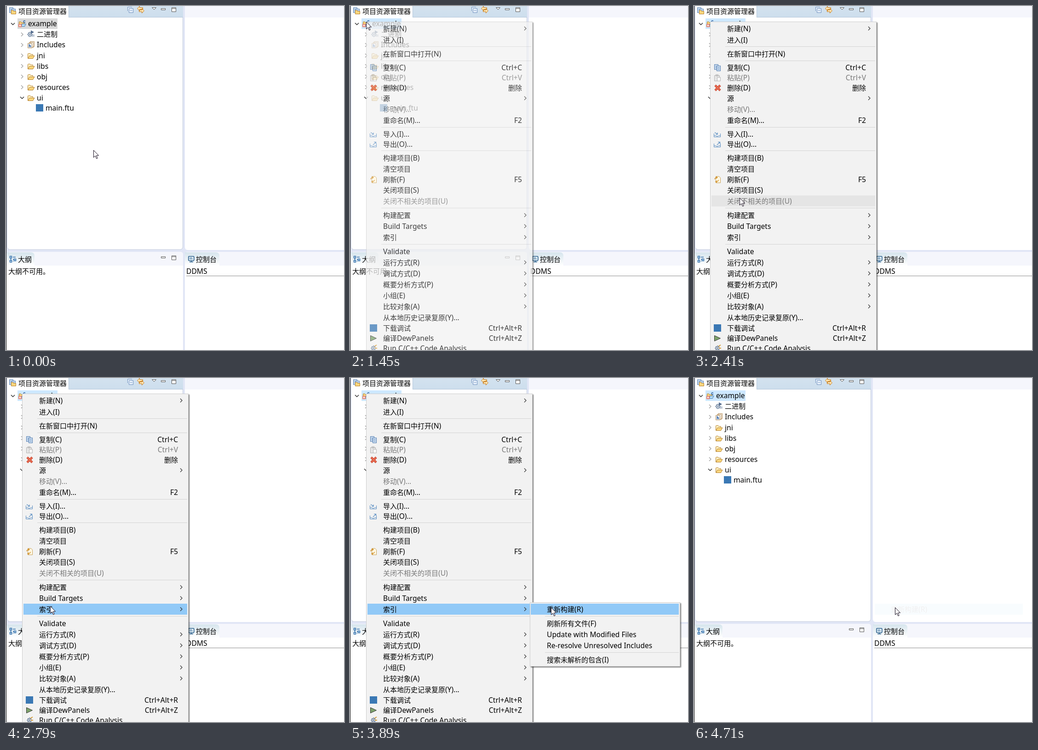
Recreate the animation shown at these times as an HTML page. Size 735 by 750 pixels, loop 4.83 s.

```html
<!DOCTYPE html>
<html lang="zh-CN">
<head>
<meta charset="utf-8">
<title>Rebuild index</title>
<style>
  html, body { margin: 0; width: 100%; height: 100%; overflow: hidden; background: #e1e6f6; }
  svg { display: block; }
  text { font: 15px "Noto Sans", "Noto Sans CJK SC", "Noto Sans CJK", sans-serif; white-space: pre; }
  .latin { font-size: 15.6px; }
  .off { fill: #7a7a7a; }
  .line { fill: none; stroke: #333; stroke-width: 1.2; }
  .panel { fill: #f2f2f2; stroke: #ccc; filter: drop-shadow(2px 2px 1px rgba(0, 0, 0, .5)); }
</style>
</head>
<body>
<svg id="stage" width="735" height="750" viewBox="0 0 735 750">
  <defs>
    <linearGradient id="bar" x2="0" y2="1"><stop stop-color="#d3e2ef"/><stop offset="1" stop-color="#cddeed"/></linearGradient>
    <linearGradient id="tab" x2="0" y2="1"><stop stop-color="#d6e5ed"/><stop offset="1" stop-color="#fff"/></linearGradient>
    <g id="folder" stroke="#b4802e" stroke-linejoin="round">
      <path d="M.5 12V2.500q0-1 1-1h4l1.500 2h4.500v2" fill="#fff0c0"/>
      <path d="M.8 12.500 4 6.500h11l-3.500 6z" fill="#fbd77e"/>
    </g>
    <g id="sheets" fill="#d9e7f5" stroke="#4a76ad">
      <path d="M.5.5h8v11h-8z"/><path d="M5.500 3.500h8v11h-8z"/>
      <path d="M7 6.500h5M7 9h5M7 11.500h5M2 3.500h3M2 6h3M2 8.500h3" stroke="#6b93c4"/>
    </g>
    <g id="gear" fill="none" stroke="#3d5a80">
      <circle cx="6" cy="9" r="4"/><circle cx="6" cy="9" r="1.500"/>
      <path d="M6 3v12M0 9h12M2 5l8 8M10 5l-8 8" stroke-dasharray="2 8 2"/>
    </g>
    <g id="tray" fill="none" stroke="#5b8ec2">
      <path d="M.5 5v7.500h14V5M.5 9.500h4l1.500 1.500h3l1.500-1.500h4"/>
    </g>
  </defs>
  <g id="window"></g>
  <g id="menu"></g>
  <g id="submenu"></g>
  <g id="chosen"></g>
  <path id="cursor" d="M.5.5v15.700l3.600-3.400 2.700 6 2.300-1-2.600-5.800h5z" fill="#fff" stroke="#150a1c"/>
</svg>
<script>
const LOOP = 4830;
const $ = id => document.getElementById(id);

const rect = (x, y, w, h, fill, extra = '') =>
  `<rect x="${x}" y="${y}" width="${w}" height="${h}" fill="${fill}" ${extra}/>`;
const path = (d, extra = 'class="line"') => `<path d="${d}" ${extra}/>`;
const use = (id, x, y) => `<use href="#${id}" x="${x}" y="${y}"/>`;
const text = (x, cy, str, extra = '') =>
  `<text x="${x}" y="${cy + 5.5}" ${extra}>${
    str.replace(/[\x20-\x7e]+/g, s => `<tspan class="latin">${s}</tspan>`)}</text>`;
const chevron = (x, y, color = '#333') => path(`M${x} ${y - 4}l4 4-4 4`, `class="line" style="stroke:${color}"`);
const opened = (x, y) => path(`M${x} ${y - 2}l4 4 4-4`, 'class="line" style="stroke-width:1.5"');
const at = (x, y, body) => `<g transform="translate(${x} ${y})">${body}</g>`;
const badge = (x, y) => rect(x, y, 16, 16, '#3a78b4');
const minMax = y =>
  path(`M337.500 ${y + 2.5}h9v3h-9zM360.500 ${y + .5}h9v9h-9zM360 ${y + 2.5}h10`, 'fill="#fff" stroke="#555"');

function drawWindow() {
  const strip = '#f5f6fc';
  const frames =
    rect(2.5, -10, 382, 541, '#fff', 'rx="6" stroke="#c3cbdc"') +
    rect(137, 0, 248, 24, 'url(#bar)') + rect(136, 24, 249, 1, '#b4c6da') + rect(136, 0, 1, 25, '#b4c6da') +
    rect(389, -10, 360, 542, '#fff', 'rx="6"') + rect(389, 0, 346, 25, strip) +
    rect(1, 536, 384, 230, '#fff', 'rx="6"') +
    path('M1 566V542q0-6 6-6h372q6 0 6 6v24z', `fill="${strip}"`) +
    path('M2 566V537h52q8 0 8 8v21z', 'fill="url(#tab)"') +
    rect(389, 536, 360, 230, '#fff', 'rx="6"') +
    path('M389 566V542q0-6 6-6h340v30z', `fill="${strip}"`) +
    path('M389 566V537h67q8 0 8 8v21z', 'fill="url(#tab)"') +
    rect(392, 588, 343, 1, '#8c8c8c') + rect(0, 0, 1, 750, '#111');

  const tools =
    at(7, 3, use('sheets', 0, 0) + path('M4.500 14.500v-8h4l1 2h5v6z', 'fill="#fbd77e" stroke="#b4802e"')) +
    path('M264.500 11V2.500H274M267.500 5.500h9v9h-9zM269.500 10h5', 'fill="#e8f1fb" stroke="#6d8fbd"') +
    path('M285.500 5.500l5-5v3h7v4h-7v3zM300.500 10.500l-5-5v3h-6v4h6v3z', 'fill="#fde3b0" stroke="#c47b1c"') +
    path('M317.500 3.500h9l-4.500 4.500z', 'fill="#fff" stroke="#555"') + minMax(3) + minMax(544);

  const outline = at(8, 545,
    path('M.5.5h4v4h-4zM.5 9.500h4v4h-4z', 'fill="#d5e8f7" stroke="#2f6ca8" stroke-width="1.400"') +
    path('M7 2.500h6M7 7.500h2M7 11.500h1M2.500 5v4', 'stroke="#2f6ca8" stroke-width="1.400"') +
    path('M9.500 6.500h4v4h-4z', 'fill="#d5e8f7" stroke="#2f6ca8" stroke-width="1.400"'));
  const screen = at(396, 545,
    rect(.8, .8, 12, 9.500, '#e8f4fb', 'rx="1.500" stroke="#2b5f8c" stroke-width="1.600"') +
    path('M3 4h6M3 6.500h7', 'stroke="#2b5f8c"') + path('M3 13h8M7 10v3', 'stroke="#2b5f8c" stroke-width="1.600"'));

  const folders = ['jni', 'libs', 'obj', 'resources', 'ui'].map((name, i) => {
    const y = 108 + 23 * i;
    return (name === 'ui' ? opened(31, y) : chevron(33, y, '#999')) + use('folder', 47, y - 6) + text(67, y, name);
  }).join('');

  const project = at(27, 31,
    path('M1.500 13V3.500h4l1 2h6V13z', 'fill="#fbd77e" stroke="#b4802e"') +
    path('M6 13.500 8 8h8l-2.500 5.500z', 'fill="#b9dcf2" stroke="#3a78b4"') +
    rect(0, 8, 7, 7, '#e0715f') + path('M1.500 9.500l4 4M5.500 9.500l-4 4', 'stroke="#fff" stroke-width="1.300"') +
    path('M15 1.500q-4-1.500-4 1.500t4 1.500', 'fill="none" stroke="#2a5f9e" stroke-width="1.400"'));
  const binary = at(46, 53, use('gear', 0, 0) +
    path('M8 0v8l7-4z', 'fill="#536b8d"') + path('M11.500 9v5M14.500 9v5', 'stroke="#536b8d"'));
  const headers = at(47, 77,
    path('M5.500 4V.5h9v11H11M3.500 6V2.500h9v11H10', 'fill="#fff" stroke="#b58c55"') +
    path('M.5 4.500h9v10h-9z', 'fill="#eef5fc" stroke="#b58c55"') +
    path('M3.500 6v7M3.500 10q3-2 3 1v2', 'fill="none" stroke="#24579a" stroke-width="1.500"'));

  const tree =
    rect(25.5, 27.5, 86, 22, '#d9d9d9', 'id="selected"') +
    opened(11, 39) + project + text(48, 38.500, 'example') +
    chevron(33, 62, '#999') + binary + text(67, 61.500, '二进制') +
    chevron(33, 85, '#999') + headers + text(67, 84.500, 'Includes') +
    folders + badge(65, 214) + text(86, 222.500, 'main.ftu');

  $('window').innerHTML = frames + tools + outline + screen + tree +
    text(27, 11.500, '项目资源管理器') + text(26, 552.500, '大纲') + text(5, 578.500, '大纲不可用。') +
    text(413, 552.500, '控制台') + text(392, 578.500, 'DDMS');
}

// centre y, label, shortcut ('>' opens a submenu), disabled
const rows = [
  [49, '新建(N)', '>'], [74, '进入(I)'], [104, '在新窗口中打开(N)'],
  [134, '复制(C)', 'Ctrl+C'], [156, '粘贴(P)', 'Ctrl+V', true], [178, '删除(D)', '删除'],
  [201, '源', '>'], [225, '移动(V)...', '', true], [249, '重命名(M)...', 'F2'],
  [279, '导入(I)...'], [301, '导出(O)...'],
  [331, '构建项目(B)'], [355, '清空项目'], [378, '刷新(F)', 'F5'],
  [401, '关闭项目(S)'], [425, '关闭不相关的项目(U)', '', true],
  [456, '构建配置', '>'], [480, 'Build Targets', '>'], [504, '索引', '>'],
  [535, 'Validate'], [559, '运行方式(R)', '>'], [583, '调试方式(D)', '>'],
  [607, '概要分析方式(P)', '>'], [631, '小组(E)', '>'], [655, '比较对象(A)', '>'],
  [679, '从本地历史记录复原(Y)...'], [702, '下载调试', 'Ctrl+Alt+R'],
  [724, '编译DewPanels', 'Ctrl+Alt+Z'], [746, 'Run C/C++ Code Analysis']
];
const subRows = [
  [504, '重新构建(R)'], [535, '刷新所有文件(F)'], [559, 'Update with Modified Files'],
  [583, 'Re-resolve Unresolved Includes'], [614, '搜索未解析的包含(I)']
];

function drawMenus() {
  const row = ([y, label, key = '', off]) => {
    const cls = off ? 'class="off"' : '';
    return text(72, y, label, cls) +
      (key === '>' ? chevron(379, y) : text(374, y, key, `${cls} text-anchor="end"`));
  };
  const icons =
    at(44, 127, use('sheets', 0, 0)) +
    at(44, 149, path('M.5 2.500h11v12H.5zM3.500.5h5v3h-5z', 'fill="#e6e6e6" stroke="#b5b5b5"') +
      path('M6.500 6.500h7v8h-7z', 'fill="#f6f6f6" stroke="#b5b5b5"')) +
    path('M46 173l11 11M57 173l-11 11', 'stroke="#c9402a" stroke-width="4.600"') +
    path('M46.500 173.500l10 10M56.500 173.500l-10 10', 'stroke="#ec7358" stroke-width="2.400"') +
    use('tray', 43, 273) + path('M45 275.500l6 4M51 276v4h-4', 'class="line" style="stroke:#5b8ec2"') +
    use('tray', 43, 295) + path('M50 303l6-6M52 296.500h4.500v4', 'class="line" style="stroke:#5b8ec2"') +
    at(44, 371, path('M3.500.5h7l3 3v11h-10z', 'fill="#fff8e4" stroke="#c9a25c"') +
      path('M1 7q0-4 5-4M4 1l3 2-3 2M9 8q0 4-5 4M6 10l-3 2 3 2', 'fill="none" stroke="#d08f26" stroke-width="1.300"')) +
    badge(43, 694) + path('M44.500 718.500v12l13-6z', 'fill="#7da36b" stroke="#333"') +
    use('gear', 45, 737) + path('M53 742l5-3M54 746h5', 'stroke="#d59a33" stroke-width="2"');

  $('menu').innerHTML =
    rect(35.5, 34.5, 361, 740, '', 'class="panel"') +
    rect(38, 0, 356, 24, '#91c9f7', 'id="hover"') +
    [89, 120, 265, 316, 441, 520].map(y => rect(68, y - 1, 326, 1, '#d4d4d4')).join('') +
    rows.map(row).join('') + icons;

  const pick = rect(393, 492, 322, 24, '#91c9f7');
  $('submenu').innerHTML =
    rect(391.5, 489.5, 326, 139, '', 'class="panel"') + `<g id="subHover">${pick}</g>` +
    [519, 598].map(y => rect(424, y, 291, 1, '#d4d4d4')).join('') +
    subRows.map(([y, label]) => text(428, y, label)).join('');
  $('chosen').innerHTML = pick + text(428, 504, subRows[0][1]);
}

const linear = p => p;
const smooth = p => p * p * (3 - 2 * p);

// start, end, jumps, x, y, easing
const moves = [
  [50, 500, 8, 39, 40, smooth], [750, 890, 3, 35, 34, linear],
  [1700, 1960, 5, 85, 225, linear], [2025, 2220, 4, 99, 357, linear],
  [2270, 2410, 3, 99, 418, linear], [2480, 2790, 6, 96, 497, linear],
  [3300, 3370, 2, 113, 498, linear], [3440, 3890, 8, 437, 500, smooth]
];
const fades = {
  menu: [[1380, .35], [1450, .75], [1500, 1], [4450, 0]],
  submenu: [[3050, .35], [3120, .75], [3180, 1], [4450, 0]],
  chosen: [[4450, .8], [4515, .6], [4580, .4], [4645, .2], [4710, .05]]
};

function pointer(t) {
  let x = 190, y = 314;
  for (const [start, end, jumps, toX, toY, ease] of moves) {
    if (t < start) break;
    const done = Math.floor((t - start) / (end - start) * (jumps - 1) + 1e-6) + 1;
    const p = ease(Math.min(1, done / jumps));
    x += (toX - x) * p;
    y += (toY - y) * p;
  }
  return [Math.round(x), Math.round(y)];
}

function render(t) {
  const [x, y] = pointer(t);
  $('cursor').setAttribute('transform', `translate(${x} ${y})`);

  for (const id in fades) {
    const value = fades[id].reduce((v, [time, next]) => t >= time ? next : v, 0);
    $(id).style.opacity = value;
    $(id).style.display = value ? '' : 'none';
  }

  $('selected').setAttribute('fill', t < 500 ? '#d9d9d9' : '#cde8ff');
  $('selected').setAttribute('stroke', t < 500 ? '#d9d9d9' : t < 890 ? '#99d1ff' : '#cde8ff');

  const over = rows.find(r => Math.abs(r[0] - y) < 12);
  $('hover').style.display = over ? '' : 'none';
  if (over) {
    $('hover').setAttribute('y', over[0] - 12);
    $('hover').setAttribute('fill', over[3] ? '#e5e5e5' : '#91c9f7');
  }
  $('subHover').style.display = x >= 393 ? '' : 'none';
}

drawWindow();
drawMenus();
render(0);

let began;
requestAnimationFrame(function tick(now) {
  began ??= now;
  render((now - began) % LOOP);
  requestAnimationFrame(tick);
});
</script>
</body>
</html>
```
